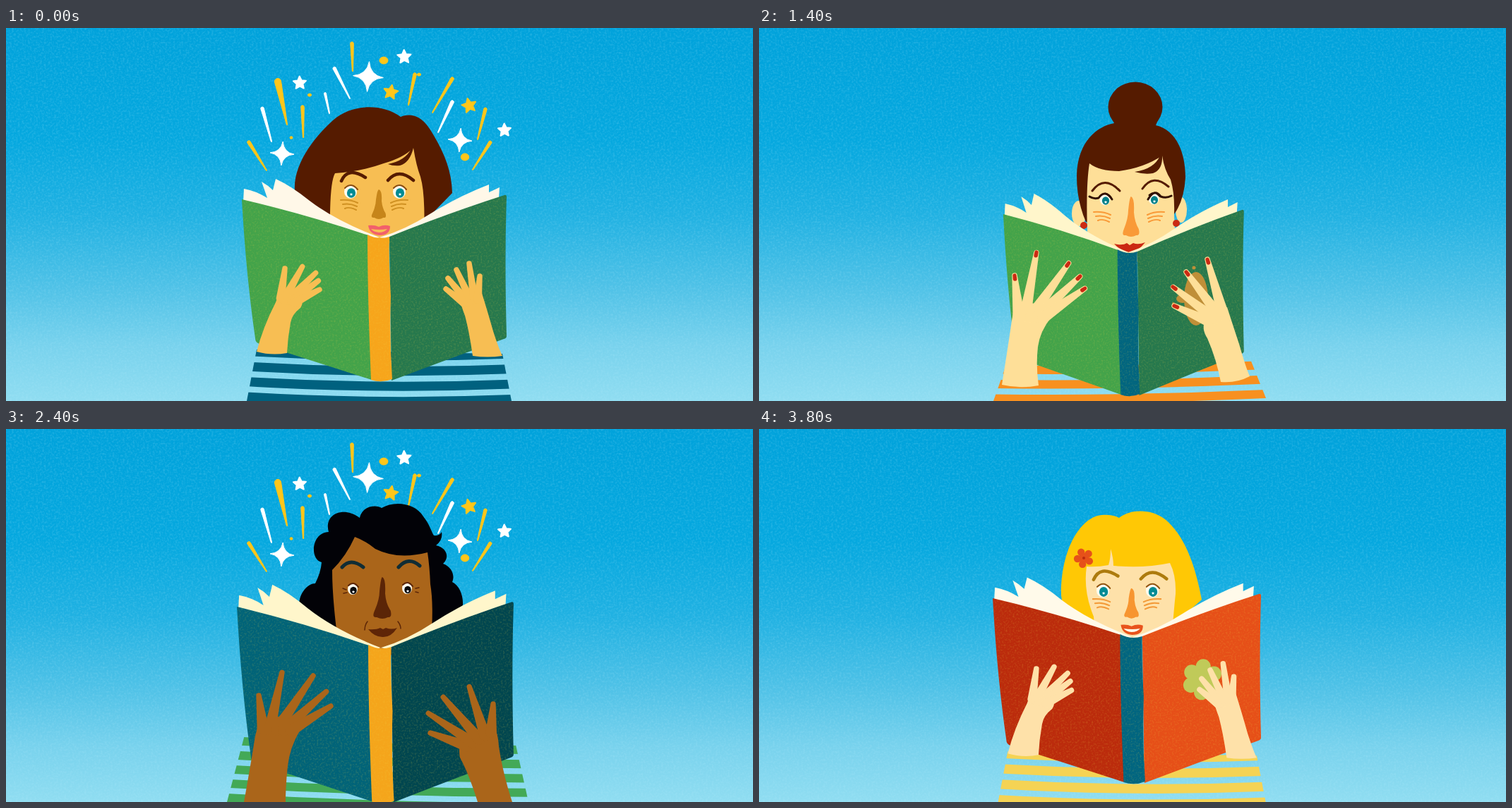
An HTML page that plays this animation: 1058x529 px, repeating every 4000 ms.

```html
<!DOCTYPE html>
<html lang="en">
<head>
<meta charset="utf-8">
<title>Readers</title>
<style>
html, body { margin: 0; width: 100%; height: 100%; overflow: hidden; background: #00a5df; }
svg { display: block; width: 100vw; height: 100vh; }
.reader { visibility: hidden; animation: turn 4s step-end infinite; animation-delay: calc(var(--i) * .8s - 4s); }
.sparks { animation: blink .4s step-end infinite; }
@keyframes turn { 0% { visibility: visible; } 20%, 100% { visibility: hidden; } }
@keyframes blink { 0% { visibility: visible; } 50%, 100% { visibility: hidden; } }
.skin { fill: var(--skin); }
.hair { fill: var(--hair); }
.left { fill: var(--left); }
.right { fill: var(--right); }
.spine { fill: var(--spine); }
.pages { fill: var(--pages); }
.nose { fill: var(--nose); }
.lips { fill: var(--lips); }
.teeth { fill: var(--teeth); }
.iris { fill: var(--iris); }
.line { fill: none; stroke-linecap: round; stroke-linejoin: round; }
.brow { stroke: var(--brow); }
.lid { stroke: var(--lid); }
.cheek { stroke: var(--cheek); stroke-width: 2; }
.stripes { stroke: var(--shirt); fill: none; }
.frame { fill: none; stroke: #006482; stroke-width: 4.5; }
.nail { fill: #cb2a13; }
</style>
</head>
<body>
<svg id="stage" viewBox="0 0 1058 529" preserveAspectRatio="none"></svg>
<script>
const TAU = Math.PI * 2;
const range = n => Array.from({ length: n }, (_, k) => k);
const polar = (x, y, r, a) => `${(x + r * Math.cos(a)).toFixed(1)} ${(y + r * Math.sin(a)).toFixed(1)}`;
const path = (cls, d, extra = '') => `<path class="${cls}" d="${d}" ${extra}/>`;
const line = (cls, d, width) => path('line ' + cls, d, width ? `stroke-width="${width}"` : '');
const oval = (x, y, rx, ry = rx, cls = '') => `<ellipse class="${cls}" cx="${x}" cy="${y}" rx="${rx}" ry="${ry}"/>`;
const group = (attr, ...parts) => `<g ${attr}>${parts.join('')}</g>`;

// Round-ended stroke that narrows from r1 to r2.
function taper(x1, y1, r1, x2, y2, r2) {
  const n = Math.atan2(y2 - y1, x2 - x1) + Math.PI / 2;
  return `M${polar(x1, y1, r1, n)}L${polar(x2, y2, r2, n)}A${r2} ${r2} 0 0 0 ${polar(x2, y2, -r2, n)}` +
    `L${polar(x1, y1, -r1, n)}A${r1} ${r1} 0 0 0 ${polar(x1, y1, r1, n)}Z`;
}

const star = (x, y, r, turn = -1.6) =>
  `M${range(10).map(k => polar(x, y, k % 2 ? r * .48 : r, turn + k * TAU / 10)).join('L')}Z`;

const glint = (x, y, r, turn = -1.5) => `M${polar(x, y, r, turn)}` + range(4).map(k =>
  `Q${polar(x, y, r * .16, turn + (k + .5) * TAU / 4)} ${polar(x, y, r, turn + (k + 1) * TAU / 4)}`).join('') + 'Z';

const flower = (x, y, n, spread, r, turn) => range(n).map(k => {
  const a = turn + k * TAU / n;
  return oval(x + spread * Math.cos(a), y + spread * Math.sin(a), r);
}).join('') + oval(x, y, spread * .8);

const ray = (x, y, dx, dy = 43, r = 2.3) => taper(x, y, r, x + dx, y + dy, .6);

const defs = `<defs>
  <linearGradient id="sky" x2="0" y2="1">
    <stop offset="0" stop-color="#00a2db"/><stop offset=".3" stop-color="#05a8df"/>
    <stop offset=".5" stop-color="#20b1e2"/><stop offset=".7" stop-color="#50c2e7"/>
    <stop offset=".85" stop-color="#78d2ed"/><stop offset="1" stop-color="#90ddf1"/>
  </linearGradient>
  <filter id="haze" x="0" y="0" width="1" height="1" color-interpolation-filters="sRGB">
    <feTurbulence type="fractalNoise" baseFrequency=".35" numOctaves="3" seed="4"/>
    <feColorMatrix values="0 0 0 0 .75  0 0 0 0 .94  0 0 0 0 1  .4 0 0 0 -.17"/>
  </filter>
  <filter id="grain" x="0" y="0" width="1" height="1" color-interpolation-filters="sRGB">
    <feTurbulence type="fractalNoise" baseFrequency=".4" numOctaves="2" seed="9"/>
    <feColorMatrix values="0 0 0 0 .95  0 0 0 0 .85  0 0 0 0 .3  .45 0 0 0 -.21"/>
    <feComposite in2="SourceAlpha" operator="in" result="specks"/>
    <feMerge><feMergeNode in="SourceGraphic"/><feMergeNode in="specks"/></feMerge>
  </filter>
</defs>`;

const sparks = group('class="sparks" stroke-linejoin="round"',
  group('fill="#ffc61a" stroke="#ffc61a"',
    path('', ray(490, 22, 1, 39) + ray(385, 76, 13, 61, 4.6) + ray(420, 112, 1) + ray(579, 66, -9) +
      ray(632, 72, -28, 48) + ray(679, 115, -11) + ray(686, 162, -25, 39) + ray(344, 162, 25, 40)),
    path('', star(545, 91, 10.5, -1.4) + star(656, 110, 10.5, -1.8), 'stroke-width="2"'),
    oval(535, 46, 6, 5), oval(430, 95, 2.6, 2), oval(404, 155.5, 2, 1.8), oval(585, 66, 2.6, 2), oval(650, 183, 5.8, 5)),
  group('fill="#fff" stroke="#fff"',
    path('', ray(465, 57, 22) + ray(452, 93, 6, 28, 1.5) + ray(363, 114, 13, 47) + ray(632, 105, -20)),
    path('', star(416, 78, 9.5) + star(564, 41, 10) + star(706, 145, 9.5), 'stroke-width="2"'),
    path('', glint(513, 69, 21.5) + glint(391, 178, 17) + glint(643, 159, 17))));

// An optional mark lies on the right cover.
const book = (mark = '') =>
  path('pages', 'M336 246L337 228Q354 231 370 241L362 218Q371 223 378 230L382 214Q404 224 430 245Q468 274 529 297L520 299Z') +
  path('pages', 'M529 297Q566 286 600 264Q640 239 684 222L684 233L699 226L698 242L544 299Z') +
  group('filter="url(#grain)"',
    path('left', 'M334 243Q424 264 513 294L518 499L359 448Q353 446 353 440Q340 350 334 243Z'),
    path('right', 'M543 296Q628 262 706 237Q709 236 709 240Q706 330 709 437Q709 440 705 441Q625 470 546 500Z'),
    path('spine', 'M512 293Q527 301 543 296Q542 330 545 380Q543 440 547 498Q532 504 517 499Q512 380 512 293Z')) + mark;

// Fingers start evenly spaced along the knuckles and end at the given tips.
const fan = ([ax, ay], [bx, by], r, tips) => tips.map(([x, y], k) => {
  const t = k / (tips.length - 1);
  return [ax + (bx - ax) * t, ay + (by - ay) * t, r, x, y, 3.7];
});
const hand = (palm, fingers) =>
  path('skin', palm) + fingers.map(f => path('skin', taper(...f))).join('');
const nails = fingers => fingers.map(([x, y, , tx, ty]) => {
  const a = Math.atan2(y - ty, x - tx);
  return path('nail', taper(tx + 5 * Math.cos(a), ty + 5 * Math.sin(a), 2.8, tx, ty, 2.6));
}).join('');

const eye = (x, y, r = 9) =>
  `<g fill="#fffdf0">${oval(x - 1, y - 1, r, r + 1)}</g>` +
  oval(x, y + 1, r * .68, r * .76, 'iris') +
  path('', star(x, y + 3, 2.3), 'fill="#fff"') +
  line('lid', `M${x - r} ${y - 6}Q${x} ${y - r - 6} ${x + r} ${y - 4}`, 2);

const wrinkles = (x, y, side) =>
  range(3).map(k => `M${x - side * (12 - k)} ${y + k * 5}q${side * 10} -5 ${side * (24 - k * 4)} ${k - 4}`).join('');
const cheeks = (lx, rx, y) => line('cheek', wrinkles(lx, y, -1) + wrinkles(rx, y, 1));

const nose = (x, y, h, w) => path('nose', `M${x} ${y}` +
  `Q${x + 5} ${y + 2} ${x + 4} ${y + h * .4}Q${x + 5} ${y + h * .65} ${x + w * .45} ${y + h * .82}` +
  `Q${x + w * .55} ${y + h} ${x + w * .3} ${y + h - 1}Q${x} ${y + h + 3} ${x - w * .3} ${y + h - 1}` +
  `Q${x - w * .6} ${y + h} ${x - w * .42} ${y + h * .82}Q${x - 4} ${y + h * .55} ${x - 4} ${y + h * .35}Q${x - 2} ${y} ${x} ${y}Z`);

const shirt = (id, outline, y0, count, step, width, sag, tilt) => {
  const rows = range(count).map(k => `M300 ${y0 + k * step}q230 ${sag} 460 ${tilt}`).join('');
  return `<clipPath id="${id}"><polygon points="${outline}"/></clipPath>` +
    group(`clip-path="url(#${id})"`, path('stripes', rows, `stroke-width="${width}"`));
};

const childShirt = id => shirt(id, '355 456 703 462 716 529 341 529', 456, 4, 21.5, 13, 16, 4);
const childFace = line('brow', 'M475 217Q484 196 509 212M541 216Q556 198 577 216', 4.5) +
  eye(489, 233) + eye(558, 233) + cheeks(486, 557, 248) + nose(528, 229, 41, 21) +
  path('lips', 'M513 280Q522 279 528 282Q536 278 544 281Q544 294 529 294Q515 293 513 280Z') +
  path('teeth', 'M517 285Q529 287 540 285Q536 290 528 290Q520 289 517 285Z');
const childHands =
  hand('M355 459Q364 424 382 389Q386 376 396 370L414 376Q424 386 417 397Q405 406 403 418Q399 440 398 461Q376 465 355 459Z',
    fan([389, 384], [409, 389], 6.5, [[395, 341], [420, 338], [439, 347], [443, 358], [444, 371]])) +
  hand('M661 465Q656 430 650 408Q645 395 643 386L655 376L674 376Q683 405 690 430Q698 455 703 465Q682 468 661 465Z',
    fan([650, 391], [668, 385], 6, [[623, 370], [626, 355], [638, 343], [656, 334], [671, 352]]));

const adultTransform = 'transform="matrix(1.045 0 0 1.08 -22 -10.4)"';
const adultTop = 'M438 219Q446 203 447 189C430 185 432 147 457 146C450 122 476 108 501 126C505 108 525 107 532 112' +
  'C550 101 580 105 591 124C600 135 603 147 606 151Q614 152 617 146Q619 158 609 165C624 168 629 182 619 191C632 196 636 208 632 217';
const adultFace = path('skin', 'M494 153Q508 158 523 170Q555 186 597 175Q600 195 601 220Q606 250 602 300L533 325L470 300Q462 240 462 200Q482 180 494 153Z') +
  line('brow', 'M476 196Q488 182 506 196M556 196Q570 180 586 194', 5) +
  eye(492, 228, 7) + eye(569, 227, 7) + nose(533, 210, 58, 26) +
  path('lips', 'M513 284Q524 285 530 282L534 284L538 282Q546 285 554 282Q545 296 533 295Q522 295 513 284Z') +
  line('nose', 'M512 273Q508 278 508 285M555 273Q559 278 559 283', '1.5" stroke="var(--nose)');
const adultShirt = id => shirt(id, '343 415 722 448 740 529 313 529', 441, 5, 20.3, 12, 14, 14);
const adultHands =
  hand('M337 529Q346 480 353 435L357 420L385 408L408 412Q420 417 416 428Q402 452 399 478Q396 505 396 529Z',
    fan([364, 425], [403, 428], 8.5, [[358, 378], [391, 345], [435, 350], [454, 372], [460, 393]])) +
  hand('M668 529Q656 490 643 466Q640 452 646 442L662 428L690 420Q697 430 698 450Q704 490 717 529Z',
    fan([653, 450], [687, 430], 8, [[601, 431], [598, 403], [619, 380], [656, 365], [690, 390]]));

const reader = (i, colours, ...parts) => group(`class="reader" style="--i:${i};${colours}"`, ...parts);

const bob = reader(0,
  '--skin:#f7be53;--hair:#551b00;--left:#43a34a;--right:#26784d;--spine:#f7a51b;--pages:#fff8e8;--nose:#c6851a;' +
  '--lips:#f2606b;--teeth:#f7be53;--iris:#008b94;--brow:#551b00;--lid:#8a4b0c;--cheek:#d09122;--shirt:#00617f',
  childShirt('bob'),
  path('hair', 'M409 232C406 190 442 150 463 131C488 108 532 106 559 126C582 117 596 135 605 151C622 180 631 203 632 234L592 275L470 280Z'),
  path('skin', 'M466 206Q505 203 535 192Q563 184 577 170Q581 195 587 211Q594 235 592 290L528 310L459 290Q458 220 466 206Z'),
  path('hair', 'M541 193Q566 188 574 171L577 170Q572 191 558 195Q548 196 541 193Z'),
  childFace, book(), childHands);

const bunLeft = fan([368, 408], [403, 410], 8.5, [[362, 351], [393, 318], [439, 333], [455, 352], [462, 369]]);
const bunRight = fan([641, 418], [656, 402], 8, [[588, 394], [586, 367], [605, 346], [635, 328]]);
const bun = reader(1,
  '--skin:#fedf98;--hair:#551b00;--left:#43a34a;--right:#26784d;--spine:#00657f;--pages:#fff6cb;--nose:#f99a38;' +
  '--lips:#cb2813;--iris:#008089;--brow:#551b00;--lid:#321000;--cheek:#f99a38;--shirt:#f8901f',
  shirt('bun', '350 478 690 455 718 525 716 529 332 529', 484, 3, 20.5, 12, 4, -8),
  group('class="skin"', oval(453, 263, 10, 18), oval(598, 258, 8, 18)),
  group('class="hair"', oval(533, 112, 38.5, 35.5)),
  path('hair', 'M500 128L566 128L562 138C592 145 604 178 604 212Q602 245 588 264L463 275Q450 245 450 210C451 160 480 139 503 135Z'),
  path('skin', 'M468 192Q482 203 510 203Q546 198 571 181Q574 201 583 215Q589 235 588 264L590 310L527 335L466 310Q462 230 468 192Z'),
  path('hair', 'M532 204Q560 200 568 181L571 181Q572 201 558 206Q546 208 532 204Z'),
  line('brow', 'M472 231Q489 208 511 231M543 228Q558 206 580 225', 3),
  eye(491, 244, 7.5), eye(560, 243, 7.5),
  line('lid', 'M468 239Q474 243 481 241Q490 228 500 243M584 238Q577 242 569 239Q560 227 551 243', 3),
  cheeks(486, 562, 265), nose(527, 239, 56, 24),
  path('lips', 'M503 306Q515 309 521 305L525 308L530 305Q537 308 547 304Q536 318 525 318Q514 318 503 306Z'),
  group('class="nail"', oval(460, 280, 5), oval(591, 277, 5)),
  group('transform="matrix(.909 0 0 1 42.3 21)"', book()),
  group('fill="#bf8f38"', oval(619, 384, 17, 38), oval(600, 384, 9, 6), oval(616, 340, 2.5), oval(587, 391, 2)),
  hand('M344 506Q353 450 358 415L361 398L385 390L408 394Q420 399 414 410Q398 430 395 452Q392 480 396 507Q370 512 344 506Z', bunLeft),
  hand('M654 502Q648 470 635 440Q626 426 632 414L648 396L663 396Q672 424 680 448Q689 480 695 494Q676 504 654 502Z', bunRight),
  nails(bunLeft), nails(bunRight));

const curls = reader(2,
  '--skin:#fed8a3;--hair:#fffefa;--left:#f0a113;--right:#ba6806;--spine:#a61f04;--pages:#fff6cb;--nose:#f38221;' +
  '--lips:#ee7c27;--iris:#006482;--brow:#706857;--lid:#f38221;--cheek:#f59135;--shirt:#dcc08f',
  adultShirt('curls'),
  path('hair', adultTop + 'C637 223 643 221 644 212Q648 226 642 234C652 250 630 263 607 258L600 275L470 275L462 262C425 264 411 241 418 228Q414 220 417 212Q424 222 438 219Z'),
  adultFace, cheeks(488, 572, 249),
  group('class="frame"', oval(494, 227, 22, 20), oval(571, 225, 22, 20)),
  path('', 'M457 211Q482 203 510 209L512 214Q490 207 475 218ZM609 208Q580 202 555 208L553 213Q577 206 592 216Z', 'fill="#006482"'),
  path('frame', 'M515 218Q532 210 549 217'),
  group('fill="#00506a"', oval(455, 267, 4), oval(609, 263, 4)),
  group(adultTransform, book()),
  group('fill="#ca2c10"',
    path('', 'M597 404Q590 386 607 374Q628 369 631 354Q639 363 660 361Q685 363 682 380Q676 398 642 402Q612 413 597 404Z'),
    oval(633, 348, 2), oval(688, 371, 2.8), oval(586, 402, 2.8, 2.2)),
  adultHands);

const waves = reader(3,
  '--skin:#aa651a;--hair:#020207;--left:#006378;--right:#00464f;--spine:#f5a51b;--pages:#fff6cb;--nose:#5b2507;' +
  '--lips:#5e2507;--iris:#08090c;--brow:#102d35;--lid:#5b2507;--cheek:#713408;--shirt:#43a957',
  adultShirt('waves'),
  path('hair', adultTop + 'C642 222 648 236 647 250L600 290L470 290L415 250C415 232 428 219 438 219Z'),
  adultFace,
  line('lid', 'M477 226l5 2m-4 5l5 -1M580 226l5 -1m-5 6l4 1', 1.5),
  group(adultTransform, book()),
  adultHands);

const clover = group('fill="#c0ca59"', flower(627, 356, 6, 18, 10.5, -1.5));
const childTransform = 'transform="matrix(1.0133 0 0 1.019 -7.4 -7.5)"';
const blonde = reader(4,
  '--skin:#fee1a9;--hair:#ffc805;--left:#bb2b0c;--right:#e64f18;--spine:#006580;--pages:#fffaea;--nose:#f79530;' +
  '--lips:#e9531c;--teeth:#fffbe8;--iris:#008b94;--brow:#ad7b0d;--lid:#92520c;--cheek:#f39a38;--shirt:#f5d354',
  group(childTransform, childShirt('blonde')),
  path('hair', 'M428 236C427 172 455 125 485 122Q500 121 510 126C526 113 556 113 575 128C602 150 618 192 627 242L590 275L474 282L430 250Z'),
  path('skin', 'M464 195Q480 196 495 193Q498 184 498 170Q502 183 502 194Q545 198 582 190Q591 208 590 234Q588 252 585 290L530 310L476 290L474 266Q459 230 464 195Z'),
  group('fill="#e6511a"', flower(460, 183, 5, 9, 5.2, -2)),
  group('fill="#b92b0d"', oval(460, 183, 2)),
  group(childTransform, childFace, book(clover), childHands));

document.getElementById('stage').innerHTML = defs +
  '<rect width="1058" height="529" fill="url(#sky)"/><rect width="1058" height="529" filter="url(#haze)"/>' +
  sparks + bob + bun + curls + waves + blonde;
</script>
</body>
</html>
```
